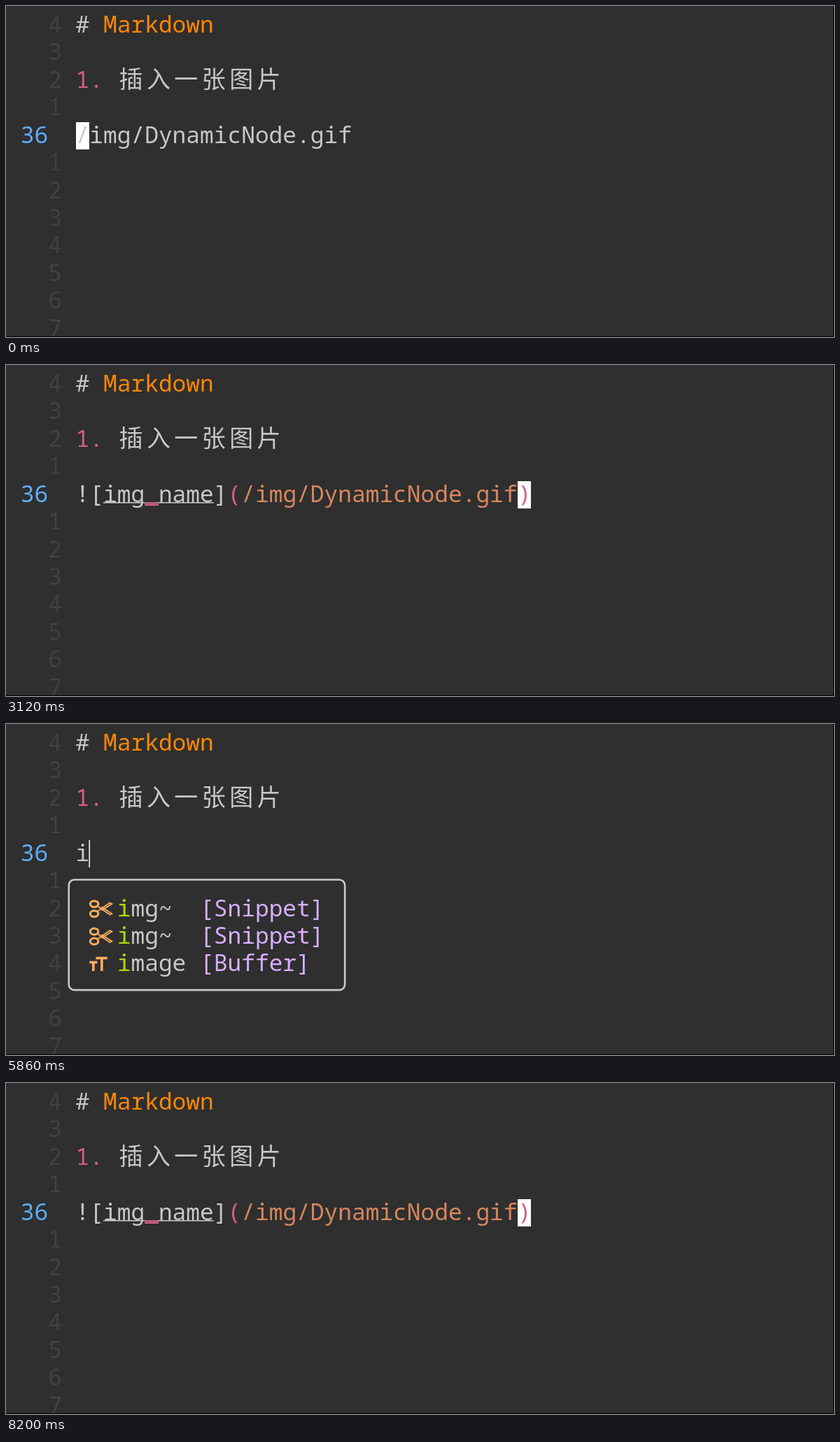
Recreate the animation shown at these times as an HTML page. Size 1183 by 473 pixels, loop 8.44 s.

```html
<!DOCTYPE html>
<html lang="zh-CN">
<head>
<meta charset="utf-8">
<title>Markdown snippet</title>
<style>
  html, body { margin: 0; width: 100%; height: 100%; overflow: hidden; background: #2f2f2f; }
  svg { display: block; width: 100vw; height: 100vh; }
  text { font: 32.87px "Noto Sans Mono", "DejaVu Sans Mono", monospace; white-space: pre; }
  text.cjk { font: 34px "Noto Sans CJK SC", "Noto Sans CJK", sans-serif; text-anchor: middle; }
</style>
</head>
<body>
<svg id="stage" viewBox="0 0 1183 473" xmlns="http://www.w3.org/2000/svg">
  <rect width="1183" height="473" fill="#2f2f2f"/>
  <g id="page"></g>
  <g id="scene"></g>
  <path d="M0 472.5H1182.5V0" fill="none" stroke="#000"/>
</svg>
<script>
const LOOP = 8440;
const CELL = 19.72, ROW = 39.43, LEFT = 99.6, TOP = 8.3;
const C = {
  bg: '#2f2f2f', fg: '#c8c8c8', dim: '#404240', blue: '#5fafff', orange: '#ff8700', pink: '#d75f87',
  link: '#d7875f', sel: '#afd7ff', amber: '#ffaf5f', green: '#afd700', purple: '#d7afff',
  white: '#fff', black: '#000'
};
const NAME = 'img_name', FILE = '/img/DynamicNode.gif', EDIT = 4;

const X = col => LEFT + col * CELL;
const Y = row => TOP + row * ROW;
const base = row => 38 + row * ROW;
const mid = row => 25.5 + row * ROW;

const box = (x, y, w, h, fill) => `<rect x="${x}" y="${y}" width="${w}" height="${h}" fill="${fill}"/>`;
const underline = (row, col, n, fill = C.fg) => box(X(col), Math.round(base(row)), n * CELL, 1.5, fill);
const bar = col => box(Math.round(X(col)) - 0.5, Math.floor(Y(EDIT)), 1.5, 39, C.white);
const block = col => cells(EDIT, col, 1, C.white);

// Fills n cells, snapped to whole pixels.
function cells(row, col, n, fill) {
  const x = Math.round(X(col));
  return box(x, Math.floor(Y(row)), Math.round(X(col + n)) - x, 39, fill);
}

// Lays runs of [string, colour, weight] side by side on the character grid.
function text(row, col, ...runs) {
  return runs.map(([s, fill = C.fg, weight = 400]) => {
    const out = `<text x="${X(col)}" y="${base(row)}" fill="${fill}" font-weight="${weight}">${s}</text>`;
    col += s.length;
    return out;
  }).join('');
}

function page() {
  let out = '';
  for (let row = 0; row < 12; row++) {
    if (row !== EDIT) out += text(row, -2, [String(Math.abs(row - EDIT)), C.dim]);
  }
  out += text(EDIT, -4, ['36', C.blue]);
  out += text(0, 0, ['# ', C.fg, 600], ['Markdown', C.orange]);
  out += text(2, 0, ['1.', C.pink, 600]);
  [...'插入一张图片'].forEach((ch, i) => {
    out += `<text class="cjk" x="${X(4 + 2 * i)}" y="${base(2) + 0.5}" fill="${C.fg}">${ch}</text>`;
  });
  return out;
}

function frame(c0, r0, c1, r1) {
  const x = X(c0 + 0.5), y = mid(r0) - 0.2;
  return `<rect x="${x}" y="${y}" width="${(c1 - c0) * CELL}" height="${(r1 - r0) * ROW}" rx="8"
    fill="${C.bg}" stroke="${C.fg}" stroke-width="2.6"/>`;
}

const at = (row, d, color, width) =>
  `<path transform="translate(${X(1)} ${mid(row) + 2})" d="${d}" fill="none" stroke="${color}" stroke-width="${width}"/>`;

function scissors(row, color) {
  const loop = y => `M1 ${y}a5.8 4.4 0 1 0 11.6 0a5.8 4.4 0 1 0 -11.6 0`;
  return at(row, loop(-7) + loop(7), color, 3) +
    at(row, 'M11 -4L29 8.5L32 7L17 -2.5M11 4L29 -8.5L32 -7L17 2.5', color, 1.8);
}

const letters = (row, color) =>
  at(row, 'M9 -8.5H25.5M17.5 -8.5V10M0 -2.5H11M5.5 -2.5V10', color, 3.6);

function item(row, hit, rest, kind, kindCol, width, chosen, icon = scissors) {
  const ink = c => chosen ? C.black : c;
  return (chosen ? cells(row, 0, width, C.sel) : '') + icon(row, ink(C.amber)) +
    text(row, 3, [hit, ink(C.green)], [rest, ink(C.fg)]) +
    text(row, kindCol, [kind, ink(C.purple)]);
}

const bangMenu = chosen => frame(-1, 5, 16, 7) + item(6, '!', '~', '[Snippet]', 6, 16, chosen);

function imgMenu(typed, chosen) {
  const hit = typed.slice(0, 2);
  const snippet = (row, on) => item(row, typed, 'img~'.slice(typed.length), '[Snippet]', 9, 19, on);
  return frame(-1, 5, 19, 9) + snippet(6, chosen) + snippet(7, false) +
    item(8, hit, 'image'.slice(hit.length), '[Buffer]', 9, 19, false, letters);
}

function docs(col) {
  const c = col + 1, y = mid(8) + 2.5;
  return frame(col, 5, col + 36, 11) +
    text(6, c, ['image _ `'], ['[markdown]', C.amber], ['`']) +
    box(X(c), mid(7) - 1.5, 35 * CELL, 2.6, C.fg) +
    `<path d="M${X(c + 1) + 4} ${y}h32m-9 -8l9 8l-9 8" fill="none" stroke="${C.fg}" stroke-width="2.6"/>` +
    text(8, c + 4, ['image']) +
    underline(10, c + 2, 13) + underline(10, c + 9, 1, C.pink) +
    text(10, c, ['![${1:img'], ['_', C.pink, 700], ['name}]('], ['$TM_SELECTED_TEXT', C.link], [')']);
}

// The finished image link; pair marks the matched brackets.
function link(pair) {
  const mark = pair ? [C.pink, 600] : [C.fg];
  return underline(EDIT, 2, NAME.length) + underline(EDIT, 5, 1, C.pink) +
    text(EDIT, 0, ['![img'], ['_', C.pink, 700], ['name]'], ['(', ...mark], [FILE, C.link], [')', ...mark]);
}

const path = () => block(0) + text(EDIT, 0, [FILE]);
const picked = () => cells(EDIT, 0, FILE.length + 1, C.sel) + block(0) +
  text(EDIT, 0, ['/'], [FILE.slice(1), C.black]);
const cut = () => block(0);
const empty = () => bar(0);
const typed = s => text(EDIT, 0, [s]) + bar(s.length);
const naming = () => cells(EDIT, 2, NAME.length, C.sel) + block(2) +
  underline(EDIT, 2, NAME.length, C.black) +
  text(EDIT, 0, ['!['], ['i'], [NAME.slice(1), C.black], [']('], [FILE, C.link], [')']);
const jumped = () => link(false) + bar(33);
const done = () => block(32) + link(true);

const timeline = [
  [0, path],
  [580, picked],
  [800, cut],
  [840, empty],
  [1450, () => typed('!') + bangMenu(false)],
  [1650, () => typed('!') + bangMenu(true)],
  [1690, () => typed('!') + bangMenu(true) + docs(17)],
  [1910, () => link(false) + bar(2)],
  [1930, naming],
  [2200, jumped],
  [3120, done],
  [3710, path],
  [4480, picked],
  [4660, cut],
  [4680, empty],
  [5860, () => typed('i') + imgMenu('i', false)],
  [6040, () => typed('im') + imgMenu('im', false)],
  [6140, () => typed('img') + imgMenu('img', false)],
  [6280, () => typed('img') + imgMenu('img', true)],
  [6320, () => typed('img') + imgMenu('img', true) + docs(20)],
  [6860, naming],
  [7130, jumped],
  [8180, () => block(32) + link(false)],
  [8200, done]
];

const scene = document.getElementById('scene');
document.getElementById('page').innerHTML = page();
let shown = null;

function render(ms) {
  const t = ms % LOOP;
  const step = timeline.findLast(([from]) => from <= t);
  if (step !== shown) {
    scene.innerHTML = step[1]();
    shown = step;
  }
}

const start = performance.now();
function tick() {
  render(performance.now() - start);
  requestAnimationFrame(tick);
}
tick();
</script>
</body>
</html>
```
